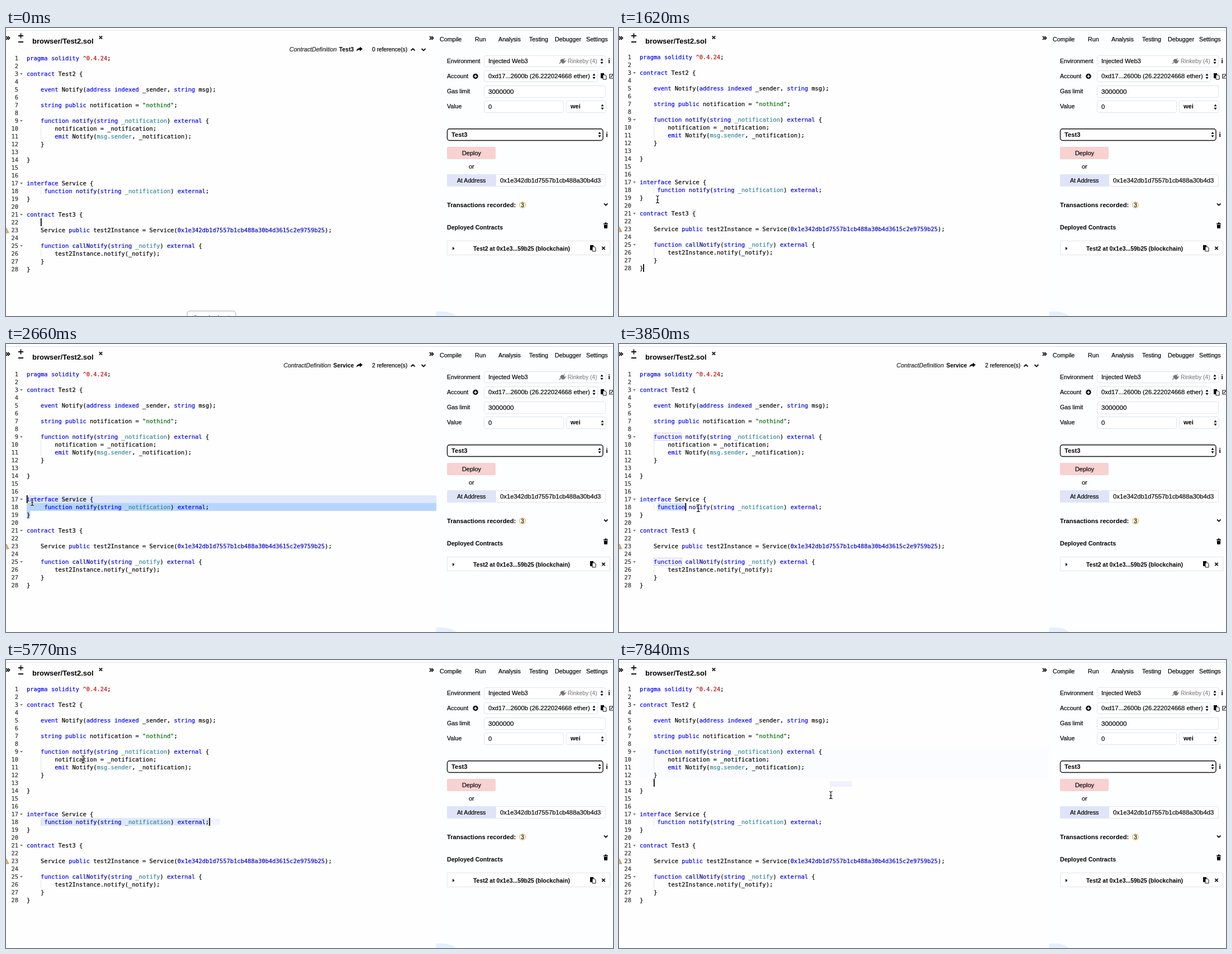
Animation of 1086 by 516 pixels, one loop 7.99 s. Source, as an HTML page:

```html
<!DOCTYPE html>
<html lang="en">
<head>
<meta charset="utf-8">
<style>
html, body { margin: 0; width: 100%; height: 100%; overflow: hidden; background: #fdfeff; }
svg { display: block; font: 10.7px "Liberation Sans", Arial, sans-serif; }
text, tspan { fill: currentColor; stroke: currentColor; stroke-width: .2; }
.code { font: 10.43px "DejaVu Sans Mono", "Liberation Mono", monospace; }
.code text { white-space: pre; }
.bold { font-weight: bold; stroke: none; }
.box { fill: #fff; stroke: #dfe3e8; }
.line { fill: none; stroke: #111; stroke-width: 1.8; }
</style>
</head>
<body>
<svg id="stage" width="1086" height="516" viewBox="0 0 1086 516"></svg>
<script>
const LOOP = 7990, STEP = 147.96;
const LEFT = 37, CHAR = 6.28, ROW = 14;

const source = `pragma solidity ^0.4.24;

contract Test2 {

    event Notify(address indexed _sender, string msg);

    string public notification = "nothind";

    function notify(string _notification) external {
        notification = _notification;
        emit Notify(msg.sender, _notification);
    }

}


interface Service {
     function notify(string _notification) external;
}

contract Test3 {

    Service public test2Instance = Service(0x1e342db1d7557b1cb488a30b4d3615c2e9759b25);

    function callNotify(string _notify) external {
        test2Instance.notify(_notify);
    }
}`.split('\n');

const colors = { key: '#0000f0', ver: '#c01010', str: '#036a07', num: '#0000cd', name: '#0000a2', arg: '#318495' };
const syntax = /(?<key>\b(?:pragma solidity|contract|event|address|indexed|string|public|function|external|emit|interface)\b)|(?<ver>\^[\d.]+)|(?<str>"\w+")|(?<num>0x\w+)|(?<name>(?<=function )\w+)|(?<arg>(?<=string )_\w+|msg\.sender)/g;

const highlight = line => line.replace(syntax, (word, ...rest) => {
  const groups = rest.at(-1);
  const kind = Object.keys(groups).find(k => groups[k]);
  return `<tspan color="${colors[kind]}">${word}</tspan>`;
});

const colX = col => LEFT + col * CHAR;
const rowY = row => 47 + (row - 1) * ROW;
const rect = (x, y, w, h, attrs) => `<rect x="${x}" y="${y}" width="${w}" height="${h}" ${attrs}/>`;
const path = (d, attrs = '') => `<path d="${d}" ${attrs}/>`;
const text = (x, y, str, size = 10.7, attrs = '') => `<text x="${x}" y="${y}" font-size="${size}" ${attrs}>${str}</text>`;
const bold = (x, y, str, size) => text(x, y, str, size, 'class="bold"');
const box = (x, y, w, h) => rect(x + .5, y + .5, w - 1, h - 1, 'rx="3" class="box"');
const line = (d, attrs = '') => path(d, 'class="line" ' + attrs);

const spinner = (x, y) => path(`M${x - 2.5} ${y - 1.2}h5l-2.5 -3.8zM${x - 2.5} ${y + 1.2}h5l-2.5 3.8z`);
const cross = (x, y) => line(`M${x - 2.7} ${y - 2.7}l5.4 5.4m0 -5.4l-5.4 5.4`, 'stroke-width="2.2"');
const chevrons = (x, y) => line(`M${x} ${y - 3}l3 3l-3 3m3.5 -6l3 3l-3 3`);
const info = (x, y) => text(x, y + 4, 'i', 11.5, 'class="bold" text-anchor="middle" font-family="Liberation Serif, serif"');
const copyIcon = (x, y) => path(`M${x - 5} ${y - 5}h6v9h-6z`) +
  path(`M${x - 1} ${y - 2}h4l2 2v6h-6z`, 'fill="#fff" stroke="#111"');

function codeText() {
  let out = '';
  for (const row of [10, 11, 18, 26])
    out += line(`M62.5 ${rowY(row)}v14`, 'style="stroke:#ccc;stroke-width:1" stroke-dasharray="1 1"');
  source.forEach((str, i) => {
    const y = rowY(i + 1);
    out += `<text x="22" y="${y + 11}" text-anchor="end" color="#333">${i + 1}</text>`;
    out += `<text x="${LEFT}" y="${y + 11}">${highlight(str)}</text>`;
    if (/^(contract|interface|    function)/.test(str))
      out += path(`M25 ${y + 6}h5l-2.5 3z`, 'fill="#777"');
  });
  return out + path(`M-4 ${rowY(23) + 12}L0.5 ${rowY(23) + 3}L5 ${rowY(23) + 12}z`, 'fill="#e2b07a" stroke="#b98a58"');
}

function panel() {
  let out = rect(0, 4, 1086, 1, 'fill="#dcdfe2"');
  out += chevrons(0, 18) + chevrons(758, 18);
  out += line('M22 14h9M26.5 9.5v9M22 25h9') + bold(47, 28, 'browser/Test2.sol', 13) + cross(169.5, 17);
  [[776, 'Compile'], [839, 'Run'], [881, 'Analysis'], [936, 'Testing'], [982, 'Debugger'], [1038, 'Settings']]
    .forEach(([x, str]) => out += text(x, 24, str));
  [[63, 'Environment'], [90, 'Account'], [117, 'Gas limit'], [144, 'Value']]
    .forEach(([y, str]) => out += text(789, y, str, 10.6));

  out += box(855, 49, 218, 21) + box(855, 76, 204, 21) + box(855, 103, 218, 22) + box(855, 130, 143, 22) + box(1002, 130, 72, 22);
  out += text(863, 63, 'Injected Web3', 11.1) + text(1005, 63, 'Rinkeby (4)', 10.3, 'color="#888"');
  out += path('M990 64l3 -3m-1 -2l4 4q3 0 4 -3l-4 -4q-3 0 -4 3zm5 -2l2.5 -2.5m0 6l2.5 -2.5', 'fill="#777" stroke="#777" stroke-width="1.3"');
  out += text(863, 90, '0xd17...2600b (26.222024668 ether)', 11.2);
  out += text(863, 118, '3000000', 11.7) + text(863, 145, '0', 11.2) + bold(1010, 144, 'wei', 11);
  out += '<circle cx="840" cy="86.5" r="4.7"/>' + line('M837.3 86.5h5.4M840 83.8v5.4', 'style="stroke:#fff;stroke-width:1.4"');
  out += spinner(1066, 59.5) + spinner(1052, 86.5) + spinner(1067, 141.5) + info(1079, 59) + copyIcon(1069, 86);
  out += line('M1086 83h-6v7h6m-4 -2l5 -5', 'style="stroke-width:1.2"');

  out += rect(789.5, 180.8, 278.5, 20.7, 'rx="4" fill="#fff" stroke="#111" stroke-width="1.4"');
  out += bold(797, 195, 'Test3', 11.2) + spinner(1062, 191) + info(1075, 191);
  out += rect(789, 213, 87, 22, 'rx="2" fill="#f8d1d1"') + text(816, 228, 'Deploy', 10.9) + text(828, 252, 'or', 10.7);
  out += box(874, 262, 199, 22) + rect(789, 262, 88, 22, 'rx="2" fill="#dfe4f8"');
  out += text(807, 277, 'At Address', 10.6) + text(884, 277, '0x1e342db1d7557b1cb488a30b4d3', 11.25);

  out += bold(789, 321, 'Transactions recorded:', 11.15);
  out += '<circle cx="924" cy="317" r="5.4" fill="#fff" stroke="#f0b840" stroke-width="1.2"/>';
  out += text(924, 320.5, '3', 10, 'text-anchor="middle"') + line('M1070 314.5l3.2 3.2l3.2 -3.2');
  out += bold(789, 361, 'Deployed Contracts', 10.6);
  out += path('M1069 350h8v1.5h-8zm2.5 -1.5h3v1.5h-3zm-1.8 4h6.6l-.5 6.5h-5.6z');
  out += rect(789.5, 381.5, 291, 25, 'fill="#fff" stroke="#e2e4e8"');
  out += path('M799 392l3.5 3l-3.5 3z') + bold(836, 398.5, 'Test2 at 0x1e3...59b25 (blockchain)', 10.43);
  out += copyIcon(1050, 394) + cross(1069, 394.5);
  return out + path('M769.5 516v-8q24 -2 36 8z', 'fill="#e6effc"');
}

// Editor title bar: the definition under the caret
function header(name, x, count) {
  return text(x, 41.5, 'ContractDefinition', 10.65, 'font-style="italic" color="#222"') +
    bold(x + 89, 41.5, name, 10.4) + text(655, 41.5, `${count} reference(s)`, 10.15) +
    path('M627 42q0 -6 6 -6v-2.5l5 4l-5 4v-2.5q-4 -.5 -6 3z') +
    line('M724.5 40.5l3.5 -3.5l3.5 3.5M743.5 37l3.5 3.5l3.5 -3.5');
}

const fillCols = (row, from, to, color) => rect(colX(from), rowY(row), (to - from) * CHAR, ROW, `fill="${color}"`);
const fillRow = (row, color) => rect(LEFT, rowY(row), 733, ROW, `fill="${color}"`);
const wordBox = (row, from, to, color = '#c9c9f5') =>
  rect(colX(from) + .5, rowY(row) + .5, (to - from) * CHAR - 1, 13, `fill="none" stroke="${color}"`);

// Each entry: first step, caret row, caret column, marks behind the text
const states = [
  [0, 22, 4, () => ''],
  [7, 28, 1, () => wordBox(21, 15, 16, '#dadada')],
  [14, 19, 1, () => ''],
  [15, 18, 5, () => fillCols(18, 5, 116.7, '#b5d5ff') + fillCols(19, 0, 1, '#b5d5ff')],
  [17, 17, 0, () => fillRow(17, '#dfe8fc') + fillRow(18, '#b5d5ff') + fillCols(19, 0, 1, '#b5d5ff')],
  [19, 18, 11, () => ''],
  [22, 18, 13, () => fillCols(18, 5, 13, '#d5e4fc') + wordBox(9, 4, 12) + wordBox(25, 4, 12)],
  [28, 18, 20, () => fillCols(18, 14, 20, '#c6ddfb') + wordBox(9, 13, 19) + wordBox(26, 22, 28)],
  [34, 18, 4, () => ''],
  [35, 18, 21, () => fillCols(18, 4, 21, '#dfe9fd')],
  [36, 18, 38, () => fillCols(18, 4, 38, '#dfe9fd')],
  [37, 18, 52, () => fillCols(18, 4, 52, '#dfe9fd') + rect(365, 286, 18, 11, 'fill="#f3f4ff"')],
  [43, 10, 14, () => ''],
  [48, 13, 4, () => rect(LEFT, 159, 733, 56, 'fill="#fbfcff"') + rect(377, 219, 40, 10, 'fill="#f0f0fe"')]
];

const pointerPath = [
  [3, 540, 506], [7, 300, 432], [8, 270, 425], [11, 69, 307], [14, 55, 306], [18, 47, 283],
  [20, 85, 290], [26, 142, 294], [28, 142, 294], [31, 61, 296], [34, 61, 296], [37, 380, 293],
  [39, 138, 178], [42, 125, 180], [45, 75, 205], [49, 390, 222], [53, 379, 242]
];

function pointerAt(n) {
  const i = pointerPath.findIndex(p => p[0] >= n);
  const b = pointerPath[i], a = pointerPath[Math.max(i - 1, 0)];
  const u = b === a ? 1 : (n - a[0]) / (b[0] - a[0]);
  const s = u * u * (3 - 2 * u);
  return [a[1] + (b[1] - a[1]) * s, a[2] + (b[2] - a[2]) * s];
}

const stage = document.getElementById('stage');
stage.innerHTML = rect(0, 0, 1086, 516, 'fill="#fdfeff"') + rect(0, 5, 770, 511, 'fill="#fefeff"') + panel() +
  `<g id="head"></g><g id="code" class="code"><g id="marks"></g>${codeText()}<g id="caret"></g></g><g id="over"></g>`;
const [head, code, marks, caret, over] = ['head', 'code', 'marks', 'caret', 'over'].map(id => document.getElementById(id));

function draw(n) {
  const [, row, col, mark] = states.findLast(s => s[0] <= n);
  const titled = n < 11 || (n >= 18 && n < 28);
  head.innerHTML = !titled ? '' : n < 11 ? header('Test3', 507, 0) : header('Service', 496.5, 2);
  code.setAttribute('transform', `translate(0 ${titled ? 0 : -2})`);
  marks.innerHTML = mark();
  caret.innerHTML = rect(colX(col) - .2, rowY(row), 1.8, ROW, 'fill="#000"');
  if (n < 1) {
    over.innerHTML = rect(324, 507, 87, 20, 'rx="5" fill="#fff" stroke="#aaa"') +
      line('M337 515.5h4m22 0h2m14 0h2m17 0h1', 'style="stroke:#777;stroke-width:1"');
  } else if (n < 3) {
    over.innerHTML = '';
  } else {
    const [x, y] = pointerAt(n);
    const beam = 'm-3 -6.5q3 0 3 2q0 -2 3 -2m-3 2v9m-3 2q3 0 3 -2q0 2 3 2m-5 -5.5h4';
    over.innerHTML = line(`M${x} ${y}${beam}`, 'style="stroke:#fff;stroke-width:2.6"') +
      line(`M${x} ${y}${beam}`, 'style="stroke-width:1.2"');
  }
}

let shown = -1;
function tick() {
  const n = Math.min(53, Math.floor((performance.now() % LOOP + 8) / STEP));
  if (n !== shown) draw(shown = n);
  requestAnimationFrame(tick);
}
tick();
</script>
</body>
</html>
```
